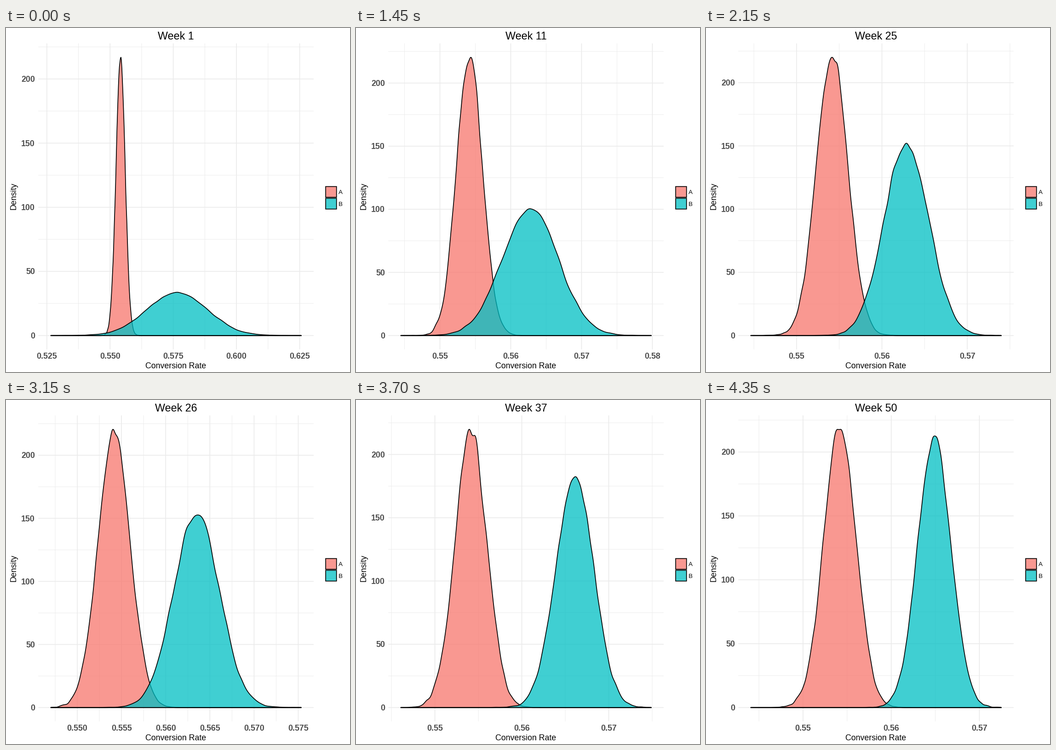
Animation, 748 px wide and 748 px high, one loop 5.35 s. Source, as a matplotlib script:

```python
import math

import numpy as np
import matplotlib.pyplot as plt
from matplotlib.animation import FuncAnimation
from matplotlib.collections import LineCollection
from matplotlib.patches import Polygon, Rectangle

SIZE, DPI = 748, 100
PT = 72 / DPI                                  # points per pixel
LEFT, RIGHT, TOP, BOTTOM = 69.7, 668.5, 33.0, 698.3
X0, X1, Y0, Y1 = 97.0, 641.5, 668.2, 63.2      # where the data begins and ends
RED, TEAL = "#F8766D", "#00BFC4"
GRID, TICK = "#EBEBEB", "#4D4D4D"

MEAN_A, SD_A = 0.55416, 0.00183

# Key weeks; everything between is interpolated on a log scale
KEYS = (1, 2, 11, 25, 26, 37, 50)
MEAN_B = (0.5765, 0.5691, 0.5628, 0.5629, 0.5635, 0.5661, 0.5649)
LOW = (0.52658, 0.52954, 0.54448, 0.54464, 0.54701, 0.54608, 0.54408)
HIGH = (0.62563, 0.60499, 0.57984, 0.57398, 0.57534, 0.57489, 0.57248)
PEAK = (216.9, 217.2, 220.4, 220.1, 220.6, 219.9, 217.8)


def week_at(frame):
    """Two sprints, each ending in a pause."""
    if frame < 63:
        return min(max(frame - 18, 1), 25)
    return min(frame - 37, 50)


def at_week(week, values):
    return np.interp(math.log(week), np.log(KEYS), values)


def sd_b(week):
    """Each week of data adds the same amount of precision."""
    return 1 / math.sqrt(1400 + 5700 * week)


def sampled_density(x, mean, sd, seed, n=50000, step=0.01):
    """Kernel density of seeded normal draws, with its natural wobble."""
    edges = np.arange(-5, 5 + step / 2, step)
    draws = np.random.default_rng(seed).normal(size=n)
    counts = np.histogram(draws, edges)[0]
    width = 0.9 * n ** -0.2
    k = np.arange(-0.5, 0.5 + step / 2, step)
    kernel = np.exp(-(k / width) ** 2 / 2)
    smooth = np.convolve(counts, kernel / kernel.sum(), mode="same") / (n * step)
    return np.interp((x - mean) / sd, edges[:-1] + step / 2, smooth) / sd


def nice_breaks(lo, hi, wanted=5):
    """Labelling by simplicity, coverage and density."""
    best, result = -1e9, None
    span = hi - lo
    for skip in (1, 2):
        for rank, q in enumerate((1, 5, 2, 2.5, 4, 3)):
            for unit in (q * 0.001, q * 0.01):
                step = skip * unit
                if not 1.5 < span / step < 10:
                    continue
                simple = 1 - rank / 5 - skip
                first = int(lo / unit)
                for i in range(first - skip, first + 2 * skip + 1):
                    for n in range(2, 11):
                        a = i * unit
                        b = a + (n - 1) * step
                        cover = 1 - 0.5 * ((hi - b) ** 2 + (lo - a) ** 2) / (0.1 * span) ** 2
                        r = (n - 1) / (b - a)
                        rt = (wanted - 1) / (max(b, hi) - min(a, lo))
                        dense = 2 - max(r / rt, rt / r)
                        score = 0.25 * simple + 0.2 * cover + 0.5 * dense
                        if score > best + 1e-9:
                            best, result = score, (a, step, n)
    a, step, n = result
    major = [a + k * step for k in range(n)]
    minor = [a + (k - 0.5) * step for k in range(n + 1)]
    return [[v for v in vals if lo <= v <= hi] for vals in (major, minor)]


# Whole numbers are pixel centres
fig = plt.figure(figsize=(SIZE / DPI, SIZE / DPI), dpi=DPI, facecolor="white")
ax = fig.add_axes([0, 0, 1, 1])
ax.set_xlim(-0.5, SIZE - 0.5)
ax.set_ylim(SIZE - 0.5, -0.5)
ax.axis("off")


def label(x, y, text, px, **kw):
    kw = {"ha": "center", "va": "baseline", "color": "black", **kw}
    return ax.text(x, y, text, fontsize=px * PT, family="Liberation Sans", **kw)


def grid(width, z):
    lines = LineCollection([], colors=GRID, linewidths=width * PT, zorder=z)
    lines.set_snap(False)
    ax.add_collection(lines, autolim=False)
    return lines


def curve(color, z):
    shape = Polygon([(0, 0), (1, 0), (1, 1)], closed=True, lw=1.7 * PT,
                    fc=(color, 0.75), ec="black", joinstyle="round", zorder=z)
    return ax.add_patch(shape)


minor_grid, major_grid = grid(0.9, 1), grid(1.7, 2)
shape_a, shape_b = curve(RED, 3), curve(TEAL, 4)
title = label(369, 24.3, "", 23.2)
x_labels = [label(0, 718.2, "", 17.8, color=TICK, weight="bold") for _ in range(10)]
y_labels = [label(62.5, 0, str(v), 17.8, color=TICK, weight="bold", ha="right")
            for v in range(0, 201, 50)]
label(369, 739.3, "Conversion Rate", 17.7)
label(21, 365, "Density", 17.7, rotation=90, rotation_mode="anchor")
for name, color, y in (("A", RED, 344.2), ("B", TEAL, 369.8)):
    ax.add_patch(Rectangle((694.6, y), 23.6, 23.4, fc=(color, 0.75), ec="black",
                           lw=1.7 * PT, snap=False))
    label(722.6, y + 16.6, name, 13.4, ha="left")


def draw(frame):
    week = week_at(frame)
    lo, hi, top, mean_b = (at_week(week, v) for v in (LOW, HIGH, PEAK, MEAN_B))

    def px(x):
        return X0 + (x - lo) / (hi - lo) * (X1 - X0)

    def py(y):
        return Y0 + y / top * (Y1 - Y0)

    x = np.linspace(lo, hi, 512)
    a = sampled_density(x, MEAN_A, SD_A, 2 * week)
    a *= top / a.max()
    b = sampled_density(x, mean_b, sd_b(week), 2 * week + 1)
    for shape, y in ((shape_a, a), (shape_b, b)):
        pts = np.column_stack([px(x), py(y)])
        shape.set_xy(np.vstack([pts, (X1, Y0), (X0, Y0)]))

    pad = 0.05 * (hi - lo)
    major, minor = nice_breaks(lo - pad, hi + pad)
    for lines, xs, ys in ((major_grid, major, range(0, 201, 50)),
                          (minor_grid, minor, range(25, 226, 50))):
        lines.set_segments([[(px(v), TOP), (px(v), BOTTOM)] for v in xs]
                           + [[(LEFT, py(v)), (RIGHT, py(v))] for v in ys])

    digits = 2 if all(abs(v * 100 - round(v * 100)) < 1e-6 for v in major) else 3
    for i, text in enumerate(x_labels):
        shown = i < len(major)
        text.set_visible(shown)
        if shown:
            text.set_x(px(major[i]))
            text.set_text(f"{major[i]:.{digits}f}")
    for i, text in enumerate(y_labels):
        text.set_y(py(50 * i) + 6.2)
    title.set_text(f"Week {week}")
    return []


anim = FuncAnimation(fig, draw, frames=107, interval=50, repeat=True,
                     repeat_delay=0, blit=False)
plt.show()
```
